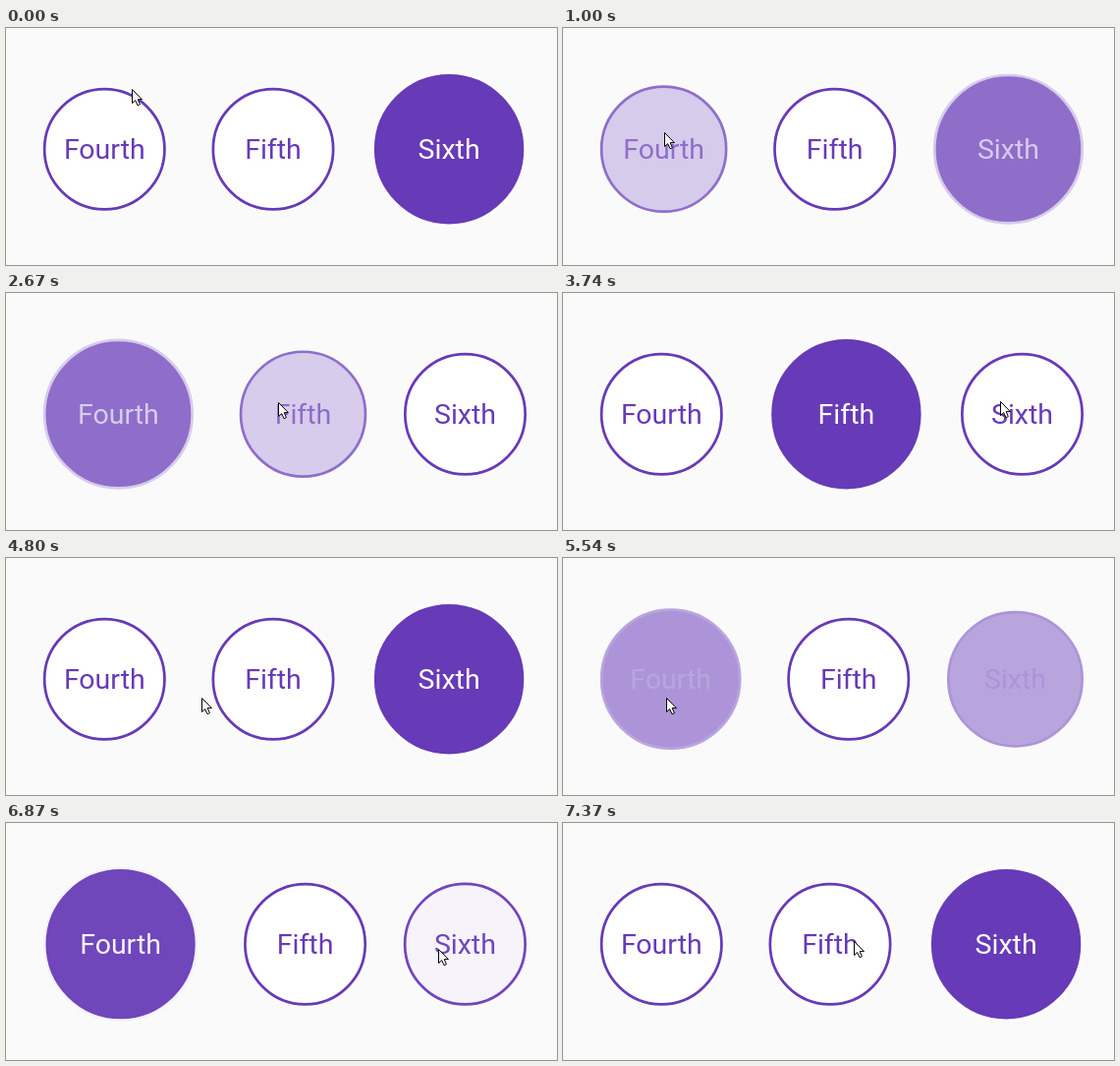
These frames come from a looping animation (561 px wide and 241 px high, 7400 ms). An HTML page:

```html
<!DOCTYPE html>
<html lang="en">
<head>
<meta charset="utf-8">
<title>Circle selector</title>
<style>
  html, body { margin: 0; width: 100%; height: 100%; overflow: hidden; background: #fafafa; }
  svg { display: block; width: 561px; height: 241px; }
  text { font: 28.5px Roboto, Arial, sans-serif; text-anchor: middle; }
</style>
</head>
<body>
<svg viewBox="0 0 561 241">
  <g id="items"></g>
  <path id="cursor" d="M.5 .5V14.5L3.7 11.6L6 16.7L8.4 15.7L6.2 10.6H10.4Z"
        fill="#fff" stroke="#000" stroke-linejoin="round"/>
</svg>
<script>
const LOOP = 7400, FADE = 500;
const SMALL = 62.5, LARGE = 78.9, BORDER = 2.7;
const LEFT = 37.8, GAPS = [46.7, 37.7, 0], MID_Y = 123.2;
const PURPLE = [103, 58, 183], WHITE = [255, 255, 255];

// [time, selected item]
const clicks = [[-1000, 2], [870, 0], [2540, 1], [3970, 2], [5270, 0], [6840, 2]];

// Spans in which the picture stands still
const holds = [[2570, 2670], [2670, 2800], [4000, 4140], [5300, 5440], [6870, 6970]];

// Pointer path: [time, x, y]
const path = [
  [0, 128, 62], [400, 103, 105], [539, 103, 105], [540, 103, 106], [1180, 103, 106],
  [1500, 176, 102], [1640, 247, 106], [1870, 275, 110], [2369, 275, 110],
  [2370, 277, 111], [2800, 277, 111], [3300, 357, 111], [3740, 445, 110],
  [4140, 445, 110], [4800, 199, 142], [4870, 169, 142], [5140, 94, 142],
  [5440, 94, 142], [6040, 306, 139], [6300, 395, 132], [6600, 440, 128],
  [6970, 440, 128], [7370, 296, 120], [7400, 296, 120]
];

const mix = (a, b, k) => a + (b - a) * k;
const shade = k => `rgb(${WHITE.map((c, i) => Math.round(mix(c, PURPLE[i], k)))})`;

// cubic-bezier(.42, 0, .58, 1)
function easeInOut(x) {
  let lo = 0, hi = 1;
  for (let i = 0; i < 24; i++) {
    const s = (lo + hi) / 2, q = 1 - s;
    if (1.26 * q * q * s + 1.74 * q * s * s + s ** 3 < x) lo = s; else hi = s;
  }
  return lo * lo * (3 - 2 * lo);
}

// Monotone cubic interpolation along the pointer path
function slope(i, axis) {
  if (i < 0 || i >= path.length - 1) return 0;
  return (path[i + 1][axis] - path[i][axis]) / (path[i + 1][0] - path[i][0]);
}
function tangent(i, axis) {
  const a = slope(i - 1, axis), b = slope(i, axis);
  return a * b > 0 ? 2 * a * b / (a + b) : 0;
}
function pointer(t, axis) {
  let i = 0;
  while (i < path.length - 2 && path[i + 1][0] <= t) i++;
  const p = path[i], n = path[i + 1], d = n[0] - p[0], s = (t - p[0]) / d;
  const h = s * s * (3 - 2 * s);
  return Math.round(mix(p[axis], n[axis], h)
    + d * s * (1 - s) * ((1 - s) * tangent(i, axis) - s * tangent(i + 1, axis)));
}

function add(parent, name) {
  return parent.appendChild(document.createElementNS("http://www.w3.org/2000/svg", name));
}
const group = document.getElementById("items");
const cursor = document.getElementById("cursor");
const items = ["Fourth", "Fifth", "Sixth"].map(label => {
  const circle = add(group, "circle"), text = add(group, "text");
  circle.setAttribute("cy", MID_Y);
  circle.setAttribute("stroke-width", BORDER);
  text.setAttribute("y", 133.4);
  text.textContent = label;
  return { circle, text };
});

function draw(t) {
  const hold = holds.find(([a, b]) => t >= a && t < b);
  if (hold) t = hold[0];

  let step = clicks.length - 1;
  while (step > 0 && clicks[step][0] > t) step--;
  const now = clicks[step][1], before = step ? clicks[step - 1][1] : now;
  const k = Math.min(1, (t - clicks[step][0]) / FADE);
  const level = (i, v) => i === now ? (before === now ? 1 : v) : i === before ? 1 - v : 0;
  const eased = easeInOut(k);

  let x = LEFT;
  items.forEach(({ circle, text }, i) => {
    const r = mix(SMALL, LARGE, level(i, eased)), fill = level(i, k);
    const front = shade(1 - fill);
    circle.setAttribute("cx", x + r);
    circle.setAttribute("r", r - BORDER / 2);
    circle.setAttribute("fill", shade(fill));
    circle.setAttribute("stroke", front);
    text.setAttribute("x", x + r);
    text.setAttribute("fill", front);
    x += 2 * r + GAPS[i];
  });
  cursor.setAttribute("transform", `translate(${pointer(t, 1)} ${pointer(t, 2)})`);
}

const start = performance.now();
function frame() {
  draw((performance.now() - start) % LOOP);
  requestAnimationFrame(frame);
}
draw(0);
requestAnimationFrame(frame);
</script>
</body>
</html>
```
